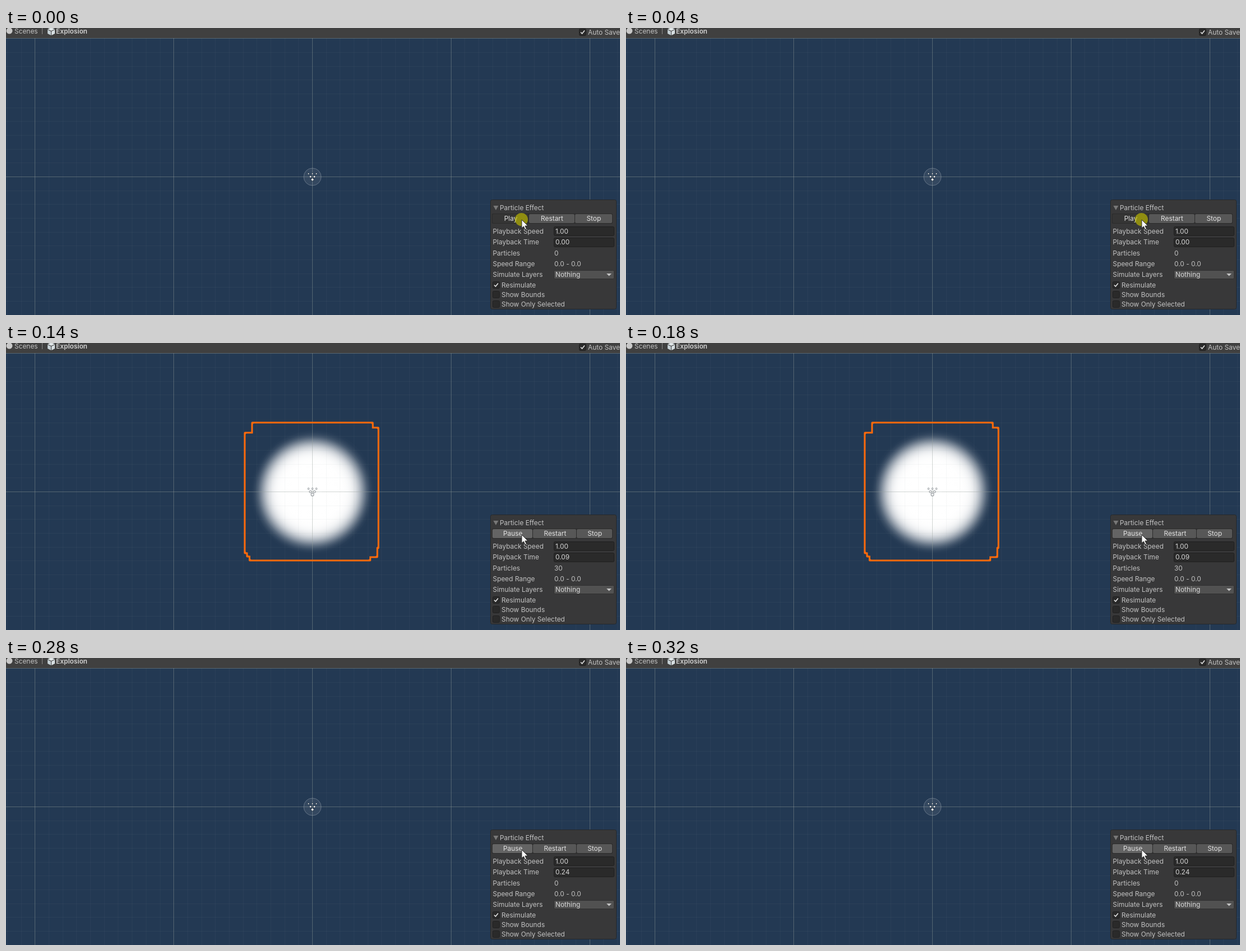
An HTML page with a canvas for the animation above (0.35 s loop, 1093x512 px).

```html
<!DOCTYPE html>
<html lang="en">
<head>
<meta charset="utf-8">
<title>Particle preview</title>
<style>
html, body { margin: 0; width: 100%; height: 100%; overflow: hidden; background: #233953; }
canvas { display: block; }
</style>
</head>
<body>
<canvas id="stage" width="1093" height="512"></canvas>
<script>
const ctx = document.getElementById('stage').getContext('2d');
const W = 1093, H = 512, CX = 545, CY = 265, STEP = 70;

// grow: how far the particles have expanded, in pixels; rgb: their colour
const states = [
  { time: '0.00', count: 0, idle: true },
  { time: '0.04', count: 30, rgb: '0,0,0', grow: 0 },
  { time: '0.09', count: 30, rgb: '255,255,255', grow: 74, gridOnTop: true },
  { time: '0.17', count: 0 },
  { time: '0.24', count: 0 }
];

// Offsets of the outermost particles from the emitter
const spread = [[.5, -15.5], [10.5, -6.5], [8.5, 9.5], [-4, 15.5], [-8.5, 8.5], [-12.5, 2.5]];

function rect(x, y, w, h, fill, border, radius = 0) {
  ctx.beginPath();
  ctx.roundRect(x, y, w, h, radius);
  ctx.fillStyle = fill;
  ctx.fill();
  if (border) stroke(border, 1);
}

function stroke(color, width) {
  ctx.strokeStyle = color;
  ctx.lineWidth = width;
  ctx.stroke();
}

function disc(x, y, r, fill) {
  ctx.beginPath();
  ctx.arc(x, y, r, 0, 2 * Math.PI);
  ctx.fillStyle = fill;
  ctx.fill();
}

function trace(points) {
  ctx.beginPath();
  points.forEach(([x, y]) => ctx.lineTo(x, y));
}

function poly(points, fill) {
  trace(points);
  ctx.closePath();
  ctx.fillStyle = fill;
  ctx.fill();
}

// y is the middle of the line of text
function text(str, x, y, fill = '#c2c2c2', weight = 400) {
  ctx.font = `${weight} 11.9px Inter, sans-serif`;
  ctx.fillStyle = fill;
  ctx.fillText(str, x, Math.round(y + 4));
}

function checkbox(x, y, checked) {
  rect(x + .5, y + .5, 12, 12, '#2a2a2a', '#202020', 2);
  if (!checked) return;
  trace([[x + 3, y + 6.5], [x + 5.5, y + 9], [x + 10, y + 3.5]]);
  stroke('#e4e4e4', 1.6);
}

function grid() {
  for (let i = -22; i <= 22; i++) {
    const d = Math.round(i * 24.68);
    ctx.fillStyle = i % 10 ? 'rgba(140,150,150,.07)' : 'rgba(150,160,155,.43)';
    ctx.fillRect(CX + d, 18, 1, H);
    ctx.fillRect(0, CY + d, W, 1);
  }
}

// Soft clumps, each standing for five stacked particles
function burst({ rgb, grow }) {
  const size = 33.5 + grow;
  for (const [dx, dy] of spread) {
    const x = CX + 1 + dx / 2, y = CY + dy / 2;
    const soft = ctx.createRadialGradient(x, y, 0, x, y, size);
    for (let i = 0; i <= 20; i++) {
      const alpha = 1 - (1 - .7 * (1 - i / 20) ** 2) ** 5;
      soft.addColorStop(i / 20, `rgba(${rgb},${alpha.toFixed(4)})`);
    }
    disc(x, y, size, soft);
  }
}

// The joined squares of all particles, widened by a margin
function squares(half) {
  ctx.beginPath();
  for (const [dx, dy] of spread)
    ctx.roundRect(CX + dx - half, CY + dy - half, 2 * half, 2 * half, 2);
}

function explosion(state) {
  const half = 33.5 + state.grow;
  squares(half + 1.5);
  ctx.fillStyle = '#ff6a0a';
  ctx.fill();
  ctx.save();
  squares(half - 1.5);
  ctx.clip();
  rect(0, 0, W, H, '#233953');
  const layers = [grid, () => burst(state)];
  if (state.gridOnTop) layers.reverse();
  layers.forEach(layer => layer());
  ctx.restore();
}

function gizmo() {
  disc(545.5, 265.5, 15.5, 'rgba(255,255,255,.08)');
  stroke('rgba(255,255,255,.25)', 1);
  for (let row = 0; row < 3; row++) {
    for (let k = 0; k < 3 - row; k++) {
      const x = 545.5 + (k - (2 - row) / 2) * 7, y = 260 + row * 5.2, r = 1.2 + row * .6;
      disc(x, y, r + .7, 'rgba(40,50,60,.45)');
      poly([[x - r, y], [x, y - r], [x + r, y], [x, y + r]], '#f4f4f4');
    }
  }
}

function toolbar() {
  rect(0, 0, W, 18, '#404040');
  disc(6, 5, 5.5, '#c8c8c8');
  text('Scenes', 15, 6);
  rect(64, 0, 1, 11, '#8a8a8a');
  poly([[80.5, -1], [87, 2], [80.5, 5], [74, 2]], '#e0e6e8');
  poly([[74, 3], [80, 6], [80, 13], [74, 10]], '#c2cdd2');
  poly([[87, 3], [81, 6], [81, 13], [87, 10]], '#d4dcdf');
  text('Explosion', 89, 6, '#d0d0d0', 600);
  checkbox(1020, 1, true);
  text('Auto Save', 1036, 8);
}

// Each button is as wide as its label plus an equal share of the free room
function buttons(idle) {
  const labels = [idle ? 'Play' : 'Pause', 'Restart', 'Stop'];
  const widths = labels.map(label => ctx.measureText(label).width);
  const room = (214 - widths.reduce((a, b) => a + b)) / 3;
  let x = 866;
  labels.forEach((label, i) => {
    const next = x + widths[i] + room, left = Math.round(x);
    const fill = i ? '#575757' : idle ? '#353535' : '#646464';
    rect(left, 332, Math.round(next) - left - 1, 16, fill, null, 2);
    text(label, x + room / 2, 340, '#e2e2e2');
    x = next;
  });
}

function panel({ time, count, idle }) {
  rect(862.5, 306.5, 224, 195, 'rgba(57,57,57,.98)', '#25292c', 3);
  poly([[867.5, 317], [876.5, 317], [872, 325]], '#777');
  text('Particle Effect', 879, 321);
  rect(865, 331, 215, 18, '#2b2b2b', null, 2);
  buttons(idle);

  const values = {
    'Playback Speed': '1.00', 'Playback Time': time, 'Particles': count,
    'Speed Range': '0.0 - 0.0', 'Simulate Layers': 'Nothing'
  };
  Object.entries(values).forEach(([label, value], i) => {
    const y = 362.6 + i * 19.45, top = Math.floor(y) - 7.5;
    const boxed = i < 2 || i > 3;
    if (i < 2) rect(975.5, top, 107, 16, '#2a2a2a', '#1f1f1f', 2);
    if (i > 3) rect(975.5, top, 107, 15, '#515151', '#303030', 2);
    text(label, 866.5, y);
    text(value, boxed ? 978 : 976, y, boxed ? '#d6d6d6' : '#c2c2c2');
  });
  poly([[1069, 438], [1078, 438], [1073.5, 442.5]], '#c4c4c4');

  ['Resimulate', 'Show Bounds', 'Show Only Selected'].forEach((label, i) => {
    const y = 459 + i * 16.8;
    checkbox(866, Math.round(y) - 7, !i);
    text(label, 882, y);
  });
}

function pointer(pressed) {
  if (pressed) disc(917.5, 341.5, 11.5, 'rgba(190,185,0,.67)');
  const x = 918, y = 342;
  poly([[x, y], [x, y + 15], [x + 3.5, y + 12], [x + 6, y + 17.5],
        [x + 8.5, y + 16.5], [x + 6, y + 11], [x + 11, y + 11]], '#f8f8f8');
  stroke('#222', .9);
}

function draw(now) {
  const state = states[Math.floor(now / STEP) % states.length];
  rect(0, 0, W, H, '#233953');
  grid();
  if (state.rgb) explosion(state);
  gizmo();
  toolbar();
  panel(state);
  pointer(state.idle);
}

const start = performance.now();
function loop() {
  draw(performance.now() - start);
  requestAnimationFrame(loop);
}
loop();
</script>
</body>
</html>
```
